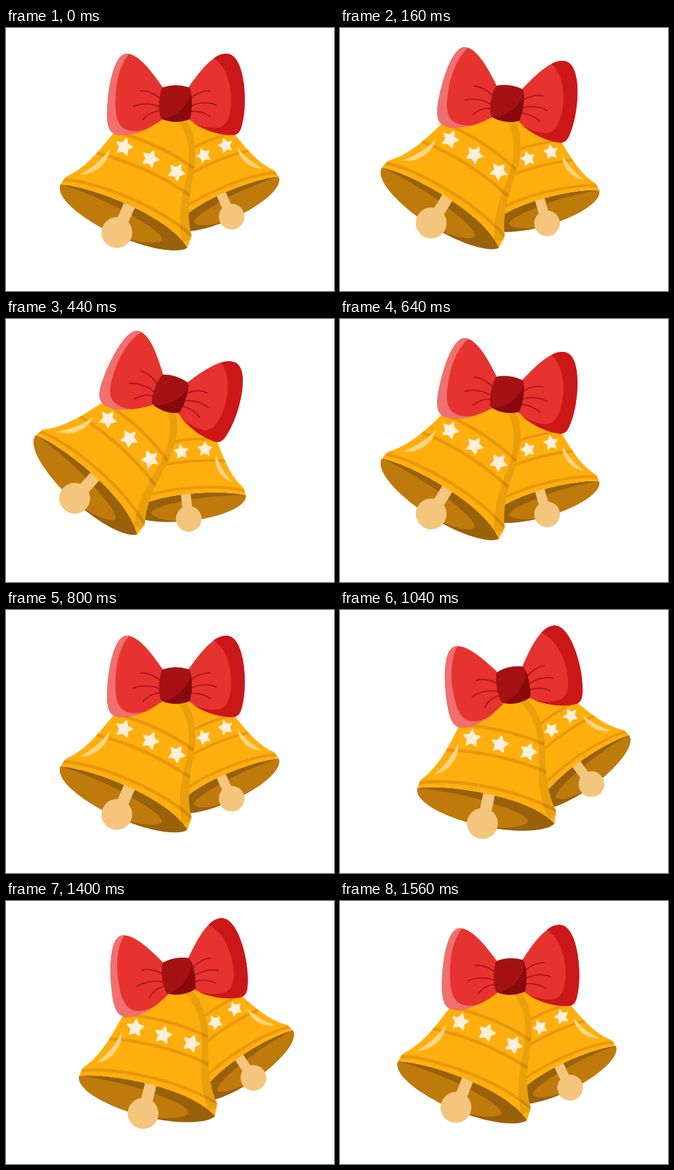
Write an HTML page that moves like this. It is 500 by 400 pixels and loops after 1600 ms.

```html
<!DOCTYPE html>
<html lang="en">
<head>
<meta charset="utf-8">
<title>Ringing bells</title>
<style>
  html, body { margin: 0; width: 100%; height: 100%; overflow: hidden; background: #fff; }
  svg { display: block; width: 500px; height: 400px; }
</style>
</head>
<body>
<svg viewBox="0 0 500 400">
  <defs>
    <path id="body" d="M83 238L89 229Q90 227 93 225.500C121 213 142 187 163 161L200 130L262 128L272 136C292 160 291 200 284 232C278 262 276 290 283 316L276.500 334C245 282 121 239 83 238Z"/>
    <clipPath id="bodyClip"><use href="#body"/></clipPath>
    <path id="star" fill="#fdefd9" stroke="#fdefd9" stroke-width="2.400" stroke-linejoin="round"/>

    <g id="bell">
      <path fill="#9a610b" d="M83 238C121 239 245 282 276.500 334C262 345 205 335 150 306C105 282 76 255 83 238Z"/>
      <path fill="#bf7a0c" d="M83 238C110 245 170 270 200 290C222 302 242 318 237 323C230 329 210 327 190 322L150 306C105 282 76 255 83 238Z"/>
      <path stroke="#f4c57d" stroke-width="18" d="M191.500 262L173 304"/>
      <circle cx="169" cy="311" r="23.500" fill="#f4c57d"/>
      <use href="#body" fill="#ffaf0d"/>
      <g clip-path="url(#bodyClip)">
        <path fill="none" stroke="#e8980a" stroke-width="5" d="M165 157Q235 176 286 213M138 190Q214 209 281 255M86 231C125 230 225 265 282 315"/>
        <path fill-opacity=".085" d="M258 136C280 160 283 195 274 232C266 265 262 285 268 325L290 320L300 140Z"/>
      </g>
      <path fill="#ffd584" d="M158 184C157 205 135 224 112 223C130 214 147 200 158 184Z"/>
      <use href="#star" transform="translate(180 181) rotate(17)"/>
      <use href="#star" transform="translate(220 199) rotate(24)"/>
      <use href="#star" transform="translate(260 219) rotate(31)"/>
    </g>
  </defs>

  <g id="scene">
    <use href="#bell" transform="translate(344 287) scale(-.833 .833) translate(-169 -311)"/>
    <use href="#bell"/>

    <path fill="#e6332f" d="M240 92C222 66 202 39 184 39C164 39 154 95 154 135C155 158 163 163 178 163C202 162 220 152 240 138Z"/>
    <path fill="#f0706f" d="M188 39.300C186 39 185 39 184 39C164 39 154 95 154 135C155 158 163 163 178 163C194 162 207 158 218 152C205 158 190 159 180 153C168 145 166 128 167 105C168 75 177 51 188 39.300Z"/>
    <path fill="#e6332f" d="M277 92C295 66 316 39 336 39C357 39 364 80 364 108C364 125 362 140 359 150C356 160 352 163 343 163C318 162 300 153 277 138Z"/>
    <path fill="#cc1719" d="M317 46C323 41 330 39 336 39C357 39 364 80 364 108C364 125 362 140 359 150C356 160 352 163 343 163C319 162 300 154 283 143C300 151 315 153 326 151C340 147 344 125 343 103C341 75 332 57 317 46Z"/>

    <g fill="none" stroke="#b01619" stroke-width="2" stroke-linecap="round">
      <path d="M205 96C214 95 226 99 236 108M194 119C207 114 224 114 236 121M209 139C216 131 225 126 236 126"/>
      <path d="M311 96C302 95 291 99 281 107M320 117C309 112 294 113 281 119M312 135C304 129 294 126 281 127"/>
    </g>

    <path fill="#a41214" d="M240 90Q258 84 278 90Q281 91 282 99Q285 118 281 136Q280 139 276 140Q258 146 240 139Q236 138 235 134Q231 116 236 96Q237 91 240 90Z"/>
    <path fill="#870a0c" d="M282 98Q285 118 281 136Q280 139 276 140Q258 146 239 139C260 134 276 120 282 98Z"/>
  </g>
</svg>
<script>
  const LOOP = 1600, STEP = 40, SWING = 20;
  const scene = document.getElementById('scene');

  const starPoints = Array.from({ length: 10 }, (_, i) => {
    const radius = i % 2 ? 6.4 : 12.6, a = i * Math.PI / 5;
    return `${radius * Math.sin(a)} ${-radius * Math.cos(a)}`;
  });
  document.getElementById('star').setAttribute('d', `M${starPoints.join('L')}Z`);

  // Linear swing: 0, +1, 0, -1, 0 over one loop
  const triangle = p => p < .25 ? 4 * p : p < .75 ? 2 - 4 * p : 4 * p - 4;

  function draw() {
    // Pose advances at 25 steps per second
    const time = Math.floor((performance.now() + 2) / STEP) * STEP % LOOP;
    scene.setAttribute('transform', `rotate(${SWING * triangle(time / LOOP)} 258 89)`);
    requestAnimationFrame(draw);
  }
  draw();
</script>
</body>
</html>
```
